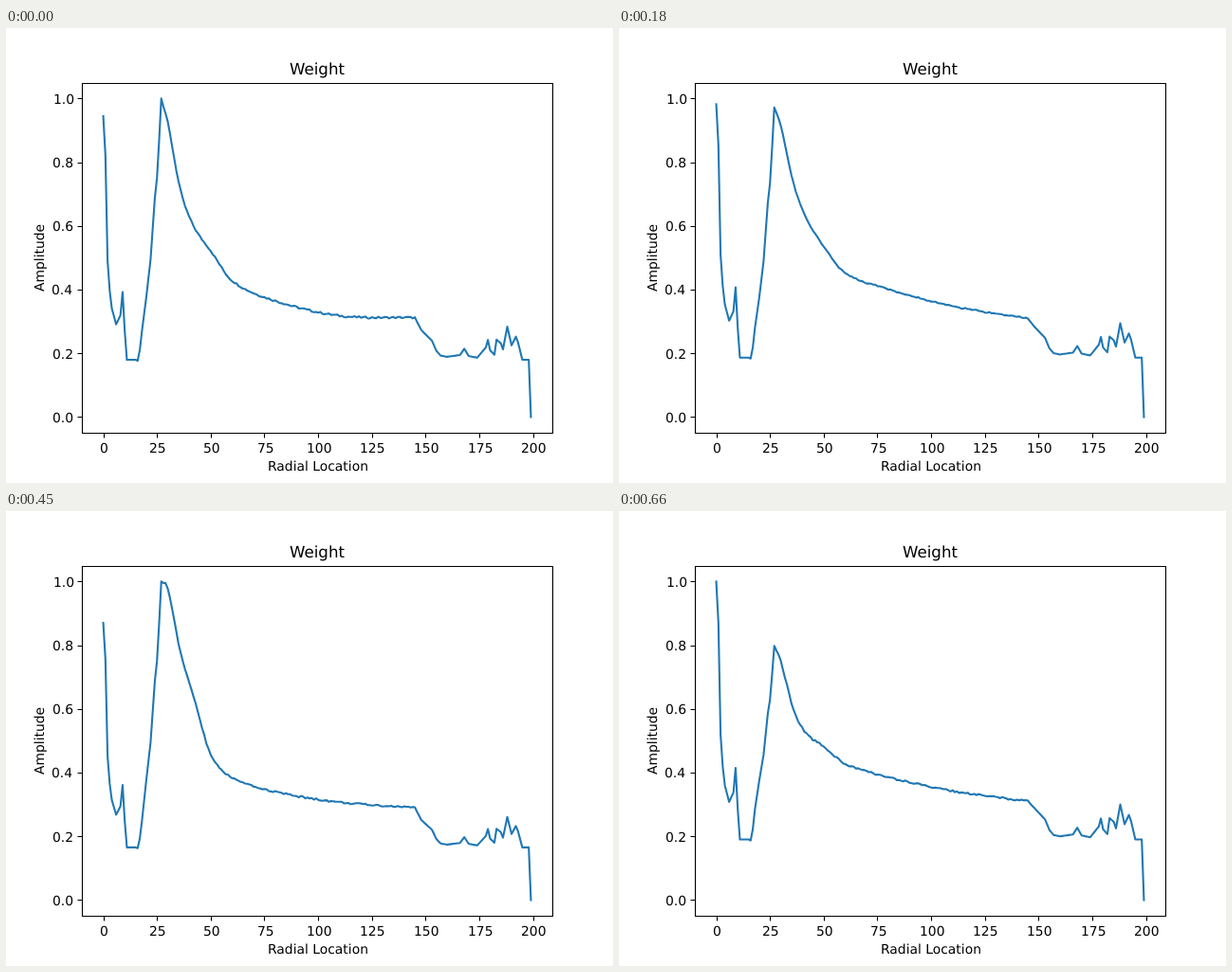
An HTML page with a canvas that plays this animation: 640 by 480 pixels, repeating every 0.69 s.

```html
<!DOCTYPE html>
<html lang="en">
<head>
<meta charset="utf-8">
<title>Weight</title>
<style>
html, body { margin: 0; width: 100%; height: 100%; overflow: hidden; background: #fff; }
canvas { display: block; }
</style>
</head>
<body>
<canvas id="plot" width="640" height="480"></canvas>
<script>
const ctx = document.getElementById('plot').getContext('2d');
const STEP = 30, STEPS = 23, POINTS = 200;
const PEAK = 27, DECAY_END = 145, RISE_START = 20, RISE_BASE = .375;

// Key points [location, value]. The ends scale with the pose, the rise with its peak.
const head = [[0, 1], [1, .87], [2, .52], [3, .42], [4, .36], [6, .308], [8, .338],
  [9, .415], [10, .285], [11, .19], [15, .19], [16, .187], [17, .222], [18, .285]];
const rise = [[RISE_START, 0], [22, .19], [24, .5], [25, .6], [26, .79]];
const tail = [[148, .289], [153, .253], [155, .22], [157, .204], [160, .2], [166, .206],
  [168, .227], [170, .203], [174, .197], [178, .231], [179, .256], [180, .222],
  [182, .207], [183, .257], [185, .245], [186, .225], [188, .3], [190, .238],
  [192, .267], [193, .248], [195, .19], [198, .19], [199, 0]];

// Decay from the peak, given at a few widening locations.
const decayAt = [PEAK, 30, 36, 42, 50, 60, 80, 110, DECAY_END];
const poses = [
  { step: 0, scale: .945, decay: [1, .925, .71, .6, .522, .428, .365, .318, .312] },
  { step: 4, scale: .97, decay: [1, .94, .755, .622, .528, .453, .4, .335, .29] },
  { step: 9, scale: 1, decay: [.93, .877, .7, .625, .548, .452, .405, .368, .338] },
  { step: 13, scale: 1, decay: [.882, .832, .68, .587, .524, .453, .399, .358, .35] },
  { step: 15, scale: .87, decay: [1, .98, .775, .64, .457, .384, .34, .307, .29] },
  { step: 18, scale: 1, decay: [.848, .81, .708, .638, .587, .49, .41, .329, .312] },
  { step: 22, scale: 1, decay: [.798, .75, .597, .522, .482, .428, .386, .342, .31] },
];

const mix = (a, b, f) => a + (b - a) * f;

function noise(seed) {
  const n = Math.sin(seed * 12.9898) * 43758.5453;
  return n - Math.floor(n) - .5;
}

function segment(xs, x) {
  let k = 0;
  while (k < xs.length - 2 && xs[k + 1] <= x) k++;
  return k;
}

function linear(xs, ys, x) {
  const k = segment(xs, x);
  return mix(ys[k], ys[k + 1], (x - xs[k]) / (xs[k + 1] - xs[k]));
}

// Cubic Hermite spline with central-difference slopes.
function smooth(xs, ys, x) {
  const k = segment(xs, x), last = xs.length - 1;
  const slope = j => {
    const a = Math.max(j - 1, 0), b = Math.min(j + 1, last);
    return (ys[b] - ys[a]) / (xs[b] - xs[a]);
  };
  const h = xs[k + 1] - xs[k], f = (x - xs[k]) / h, g = 1 - f;
  return ys[k] * g * g * (1 + 2 * f) + ys[k + 1] * f * f * (3 - 2 * f)
    + h * f * g * (slope(k) * g - slope(k + 1) * f);
}

for (const pose of poses) {
  const { step, scale, decay } = pose;
  const scaled = ([x, v]) => [x, v * scale];
  const keys = [
    ...head.map(scaled),
    ...rise.map(([x, f]) => [x, mix(RISE_BASE, decay[0], f)]),
    [PEAK, decay[0]],
    [DECAY_END, decay.at(-1)],
    ...tail.map(scaled),
  ];
  const xs = keys.map(key => key[0]), ys = keys.map(key => key[1]);
  pose.curve = Array.from({ length: POINTS }, (_, i) =>
    i > PEAK && i <= DECAY_END
      ? smooth(decayAt, decay, i) + noise(i + step * POINTS) * .006
      : linear(xs, ys, i));
}

function curveAt(step) {
  const k = segment(poses.map(pose => pose.step), step);
  const a = poses[k], b = poses[k + 1];
  const f = (step - a.step) / (b.step - a.step);
  return a.curve.map((v, i) => mix(v, b.curve[i], f));
}

const xOf = i => 80 + 496 * (i + 9.95) / 218.9;
const yOf = v => 410.4 - 336 * v;
const snap = v => Math.round(v) + .5;

// Aligns by the inked width and starts on a whole pixel; align is 0.5 centre, 1 right.
function label(text, x, y, align = .5, size = 13.89) {
  ctx.font = `${size}px "DejaVu Sans", sans-serif`;
  ctx.textRendering = 'geometricPrecision';
  const box = ctx.measureText(text);
  const ink = box.actualBoundingBoxLeft + box.actualBoundingBoxRight;
  ctx.fillText(text, Math.round(x - ink * align), y);
}

function drawAxes() {
  ctx.fillStyle = ctx.strokeStyle = '#000';
  ctx.lineWidth = 1.11;
  ctx.beginPath();
  ctx.rect(80.5, 58.5, 496, 369);
  for (let i = 0; i <= 200; i += 25) {
    const x = snap(xOf(i));
    ctx.moveTo(x, 427.5);
    ctx.lineTo(x, 432.5);
    label(String(i), xOf(i), 448);
  }
  for (let n = 0; n <= 5; n++) {
    const y = yOf(n / 5);
    ctx.moveTo(80.5, snap(y));
    ctx.lineTo(75.5, snap(y));
    label((n / 5).toFixed(1), 70.3, Math.round(y + 5.4), 1);
  }
  ctx.stroke();
  label('Weight', 328, 49, .5, 16.67);
  label('Radial Location', 328, 467);
  ctx.save();
  ctx.translate(40, 243);
  ctx.rotate(-Math.PI / 2);
  label('Amplitude', 0, 0);
  ctx.restore();
}

function drawCurve(values) {
  ctx.save();
  ctx.strokeStyle = '#1f77b4';
  ctx.lineWidth = 2.08;
  ctx.lineJoin = 'round';
  ctx.lineCap = 'square';
  ctx.beginPath();
  values.forEach((v, i) => ctx.lineTo(xOf(i), yOf(v)));
  ctx.stroke();
  ctx.restore();
}

function frame() {
  const step = Math.floor(performance.now() / STEP) % STEPS;
  ctx.fillStyle = '#fff';
  ctx.fillRect(0, 0, 640, 480);
  drawCurve(curveAt(step));
  drawAxes();
  requestAnimationFrame(frame);
}
frame();
</script>
</body>
</html>
```
